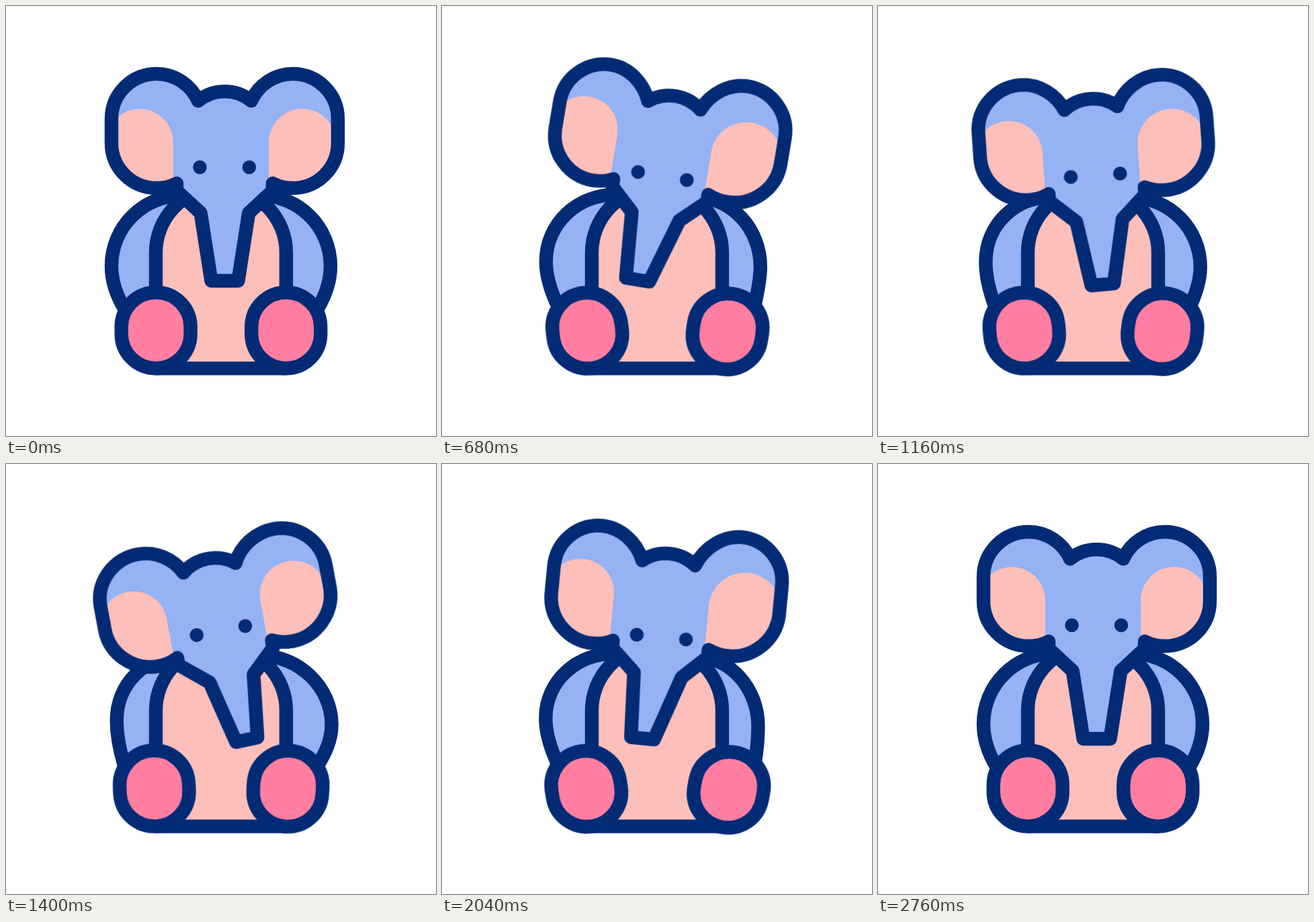
An HTML page without scripts for the animation above (3 s loop, 640x640 px).

```html
<!DOCTYPE html>
<html lang="en">
<head>
<meta charset="utf-8">
<title>Elephant</title>
<style>
html, body { margin: 0; height: 100%; overflow: hidden; background: #fff; }
svg { display: block; width: 100vw; height: 100vh; }

.line { stroke: #032b75; stroke-width: 20.4; stroke-linecap: round; stroke-linejoin: round; }
.none { fill: none; }
.ink { fill: #032b75; }
.blue { fill: #94b2f4; }
.pink { fill: #fdbfba; }
.rose { fill: #ff7ea1; }

svg * { animation: 3s cubic-bezier(.4, 0, .6, 1) infinite; }

/* Head: sinks, tilts from side to side and comes back up */
.sink { animation-name: sink; }
@keyframes sink {
  0%, 6.67% { transform: none; animation-timing-function: cubic-bezier(.3, .1, .6, 1); }
  46.67% { transform: translateY(11.5px); animation-timing-function: cubic-bezier(.4, 0, .5, 1); }
  92%, 100% { transform: none; }
}
.tilt { transform-origin: 325.2px 265px; animation-name: tilt; }
@keyframes tilt {
  0%, 6.67% { transform: rotate(0deg); animation-timing-function: cubic-bezier(.33, 0, .67, 1); }
  27.33% { transform: rotate(10.8deg); animation-timing-function: cubic-bezier(.33, 0, .67, 1); }
  45.33% { transform: rotate(-10.6deg); animation-timing-function: cubic-bezier(.6, 0, .6, 1); }
  66.33% { transform: rotate(6deg); animation-timing-function: cubic-bezier(.3, .35, .55, 1); }
  92%, 100% { transform: rotate(0deg); }
}

/* Eyes and left inner ear slide along the head, right inner ear swells */
.slide { animation-name: slide; }
.eyes { --a: 8px; --b: -5px; --c: 12px; }
.inner-l { --a: -4.7px; --b: 1px; --c: -6px; }
@keyframes slide {
  0%, 6.67%, 92%, 100% { transform: translateY(0); }
  25.33% { transform: translateY(var(--a)); }
  51.33% { transform: translateY(var(--b)); animation-timing-function: cubic-bezier(.6, 0, .6, 1); }
  68% { transform: translateY(var(--c)); animation-timing-function: cubic-bezier(.3, .2, .6, 1); }
}
.inner-r { transform-origin: 391px 266px; animation-name: swell; }
@keyframes swell {
  0%, 6.67%, 92%, 100% { transform: scale(1); }
  25.33% { transform: scale(1.06, 1.05); }
  51.33% { transform: scale(1); animation-timing-function: cubic-bezier(.6, 0, .6, 1); }
  68% { transform: scale(1.08, 1.075); animation-timing-function: cubic-bezier(.3, .2, .6, 1); }
}

.ear-l { animation-name: ear-l; }
@keyframes ear-l {
  0%, 6.67%, 92%, 100% { d: path("M254 264Q240 271 224 271c-37 0 -67 -30 -67 -67v-36c0 -37 30 -67 67 -67c27 0 51 16 62 40"); }
  25.33% { d: path("M254 264Q240 271 224 271c-37 0 -67 -30 -67.5 -67v-40.5c0 -37 30 -67 67 -67c27 0 51 19 62.5 44.5"); }
  51.33% { d: path("M254 264Q240 271 224 271c-37 0 -68 -30 -68.5 -67v-35c0 -37 31 -67 68.5 -67c27 0 51 16 62 39"); animation-timing-function: cubic-bezier(.6, 0, .6, 1); }
  68% { d: path("M254 264Q240 271 224 271c-37 0 -67 -30 -68 -67v-41.5c0 -37 29 -67 66 -67c27 0 53 19 64 45.5"); animation-timing-function: cubic-bezier(.3, .2, .6, 1); }
}
.ear-r { animation-name: ear-r; }
@keyframes ear-r {
  0%, 6.67%, 92%, 100% { d: path("M397 264Q411 271 427 271c37 0 67 -30 67 -67v-36c0 -37 -30 -67 -67 -67c-27 0 -51 16 -62 40"); }
  25.33% { d: path("M397 264Q411 270 427 270c37 0 68 -30 69 -67v-41c0 -37 -30 -67 -67 -67c-27 0 -53 19 -64 46"); }
  51.33% { d: path("M397 264Q411 271 427 271c37 0 68 -30 69.5 -67v-35c0 -37 -30 -67 -67 -67c-27 0 -53 16 -64.5 39"); animation-timing-function: cubic-bezier(.6, 0, .6, 1); }
  68% { d: path("M397 264Q411 270.5 427 270.5c37 0 68 -30 69.5 -67v-44c0 -37 -29 -67 -66 -67c-27 0 -54 20 -65.5 48.5"); animation-timing-function: cubic-bezier(.3, .2, .6, 1); }
}

.trunk { animation-name: trunk; }
@keyframes trunk {
  0%, 6.67%, 92%, 100% { d: path("M254 265V275L289.7 308L305.5 409L345.5 409L361.3 308L397 275V265"); }
  25.33% { d: path("M254 265V275L289 308L296 406L331 406L361 309L397 275V265"); }
  51.33% { d: path("M254 265V275L295 309L318.5 403L351 402L361 309L397 275V265"); animation-timing-function: cubic-bezier(.6, 0, .6, 1); }
  68% { d: path("M254 265V275L289.7 308L294.5 404.7L329 404.7L361 309L397 275V265"); animation-timing-function: cubic-bezier(.3, .2, .6, 1); }
}

.arm-l { animation-name: arm-l; }
@keyframes arm-l {
  0%, 6.67%, 92%, 100% { d: path("M262 282C204 282 157 329 157 387C157 410 164 430 176 450H223"); }
  25.33% { d: path("M262 281C200 279 154.7 325 154.7 380C154.7 403 162 425 173 448H223"); }
  51.33% { d: path("M264 286C206 286 165.5 328 165.5 382C165.5 405 170 427 176 448H223"); animation-timing-function: cubic-bezier(.6, 0, .6, 1); }
  68% { d: path("M262 282C199 280 154.3 325 154.3 378C154.3 403 162 425 173 448H223"); animation-timing-function: cubic-bezier(.3, .2, .6, 1); }
}
.arm-r { animation-name: arm-r; }
@keyframes arm-r {
  0%, 6.67%, 92%, 100% { d: path("M378 282C436 282 483 329 483 387C483 410 476 430 464 450H417"); }
  25.33% { d: path("M378 285C432 285 473.5 333 473.5 388C473.5 408 469 427 465 448H417"); }
  51.33% { d: path("M378 285C436 285 485.5 332 485.5 388C485.5 412 475 432 463 450H417"); animation-timing-function: cubic-bezier(.6, 0, .6, 1); }
  68% { d: path("M378 287C430 287 470.5 335 470.5 390C470.5 409 469 427 465 448H417"); animation-timing-function: cubic-bezier(.3, .2, .6, 1); }
}

.foot { animation-name: foot; }
.left { --turn: -.83; transform-origin: 223px 539px; }
.right { --turn: 1; transform-origin: 410px 539px; }
@keyframes foot {
  0%, 6.67%, 92%, 100% { transform: rotate(0deg); }
  27.33% { transform: rotate(calc(var(--turn) * 9.6deg)); animation-timing-function: cubic-bezier(.5, 0, .5, 1); }
  53.33% { transform: rotate(calc(var(--turn) * 2.1deg)); animation-timing-function: cubic-bezier(.6, 0, .6, 1); }
  69.33% { transform: rotate(calc(var(--turn) * 10.5deg)); animation-timing-function: cubic-bezier(.6, 0, .6, 1); }
}
</style>
</head>
<body>
<svg viewBox="0 0 640 640">
  <path class="line blue arm-l"/>
  <path class="line blue arm-r"/>
  <path class="line pink" d="M223 539.4V367A97 97 0 0 1 417 367V539.4Z"/>
  <rect class="line rose foot left" x="171.7" y="426.2" width="103" height="113.2" rx="51.5"/>
  <rect class="line rose foot right" x="365.3" y="426.2" width="103" height="113.2" rx="51.5"/>

  <g class="sink">
    <g class="tilt">
      <path class="blue" d="M244 266L276 145L286 141A63 63 0 0 1 365 141L375 145L407 266L389 275H262Z"/>
      <path class="blue ear-l"/>
      <path class="blue ear-r"/>
      <path class="pink slide inner-l" d="M249 266V203A50 50 0 0 0 157 176V204C157 241 187 271 224 271Q240 271 249 266Z"/>
      <path class="pink inner-r" d="M391 266V203A50 50 0 0 1 491 203C491 241 464 271 427 271Q411 271 391 266Z"/>
      <path class="line blue trunk"/>
      <path class="line none" d="M286 141A63 63 0 0 1 365 141"/>
      <path class="line none ear-l"/>
      <path class="line none ear-r"/>
      <g class="ink slide eyes">
        <circle cx="288.5" cy="240" r="10.3"/>
        <circle cx="362" cy="240" r="10.3"/>
      </g>
    </g>
  </g>
</svg>
</body>
</html>
```
